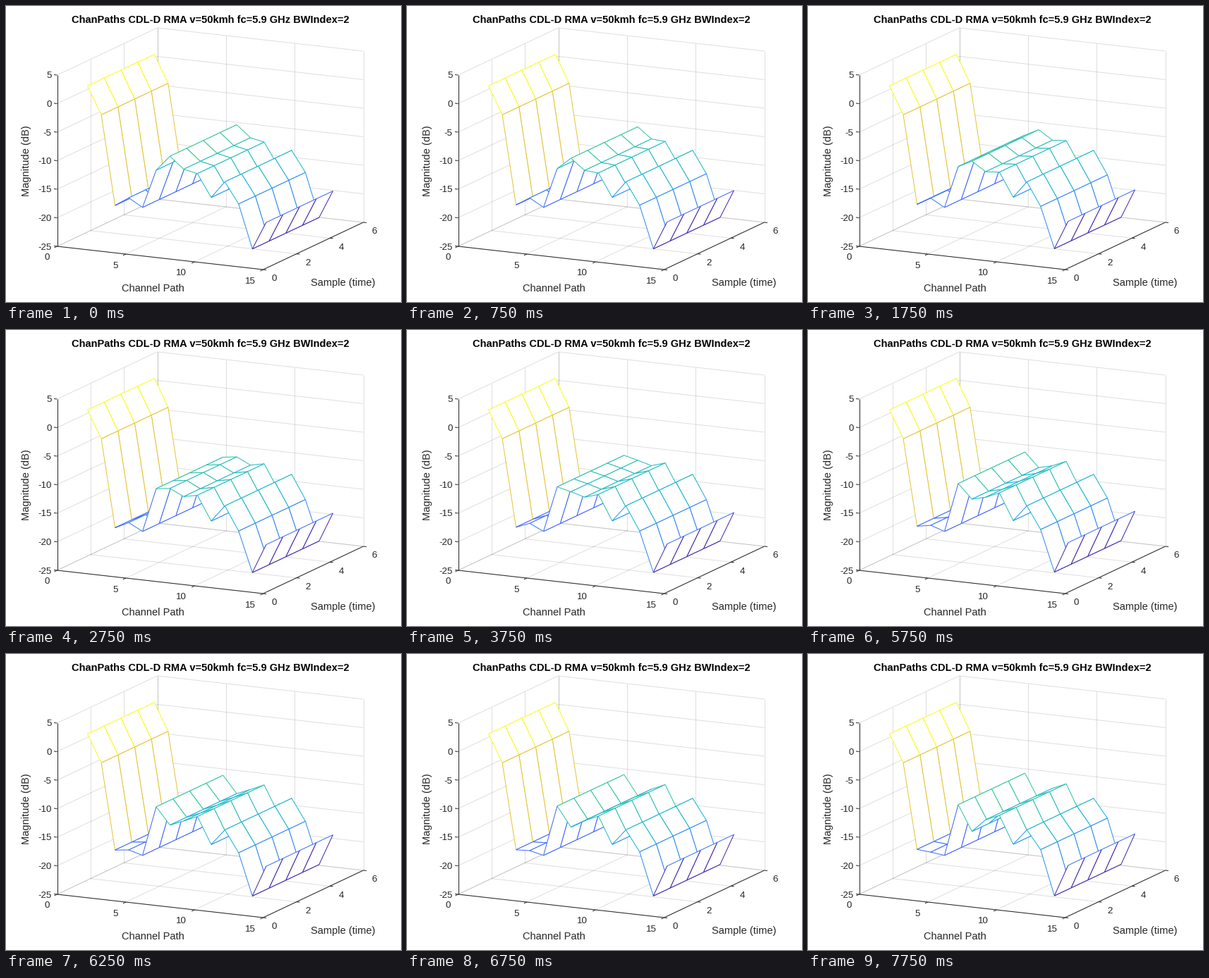
Write a matplotlib script that moves like this. It is 560 by 420 pixels and loops after 8 s.

```python
import numpy as np
import matplotlib.pyplot as plt
from matplotlib.animation import FuncAnimation
from matplotlib.collections import LineCollection, PolyCollection
from matplotlib.colors import LinearSegmentedColormap

W, H, DPI = 560, 420, 100
FRAMES, INTERVAL = 32, 250
SAMPLES = range(1, 6)
FLOOR, TOP = -25, 5
INK = (0.15, 0.15, 0.15)
PX = 72 / DPI  # points per pixel

# Power of each channel path in dB, at the start of the loop.
START = np.array([2.0, -2.8, -18.4, -16.8, -18.2, -11.4, -8.7,
                  -10.7, -11.2, -15.1, -12.1, -15.7, -23.3, -18.4])
# Fading paths: slope and curvature over one loop, in dB.
FADE = {3: (0.9, -0.2), 4: (0, -1.1), 6: (2.9, -0.55), 7: (-3.6, -1.15),
        8: (-2.35, 1.9), 9: (1.2, -0.1), 10: (0.2, 0), 12: (-2.6, 3),
        13: (0.2, 0), 14: (0.9, 0)}

parula = LinearSegmentedColormap.from_list("parula", [
    (0.242, 0.150, 0.660), (0.281, 0.323, 0.958), (0.179, 0.529, 0.968),
    (0.069, 0.695, 0.839), (0.216, 0.784, 0.592), (0.672, 0.779, 0.223),
    (0.997, 0.766, 0.220), (0.977, 0.984, 0.080),
])

plt.rcParams["font.family"] = "Liberation Sans"
fig = plt.figure(figsize=(W / DPI, H / DPI), dpi=DPI, facecolor="white")
ax = fig.add_axes([0, 0, 1, 1])
ax.set_xlim(0.5, W + 0.5)
ax.set_ylim(H, 0)
ax.axis("off")


def project(x, y, z):
    """Orthographic view: path, sample and dB to stage pixels."""
    return (73 + 19.47 * x + 23.67 * y,
            341 + 2.2 * x - 11.17 * y - 8.1 * (z - FLOOR))


def segment(a, b):
    return [project(*a), project(*b)]


def add_lines(lines, color):
    ax.add_collection(LineCollection(lines, colors=[color], linewidths=PX))


def label(x, y, text, size=14.67, **style):
    style = {"color": INK, "ha": "center", "va": "center_baseline", **style}
    ax.text(x, y, text, fontsize=size * PX, **style)


def draw_grid():
    lines = []
    for z in range(FLOOR, TOP + 1, 5):
        lines.append(segment((0, 0, z), (0, 6, z)))
        lines.append(segment((0, 6, z), (15, 6, z)))
    for x in range(0, 16, 5):
        lines.append(segment((x, 6, FLOOR), (x, 6, TOP)))
        lines.append(segment((x, 0, FLOOR), (x, 6, FLOOR)))
    for y in range(0, 7, 2):
        lines.append(segment((0, y, FLOOR), (0, y, TOP)))
        lines.append(segment((0, y, FLOOR), (15, y, FLOOR)))
    add_lines(lines, (*INK, 0.15))


def draw_axis(points, values, tick, offset, ha):
    """Axis line through the points, with a tick and a number at each."""
    spots = [project(*p) for p in points]
    lines = [[spots[0], spots[-1]]]
    for (x, y), value in zip(spots, values):
        lines.append([(x, y), (x + tick[0], y + tick[1])])
        label(x + offset[0], y + offset[1], str(value), 13.33, ha=ha)
    add_lines(lines, INK)


draw_grid()
levels, paths, times = range(FLOOR, TOP + 1, 5), range(0, 16, 5), range(0, 7, 2)
draw_axis([(0, 0, z) for z in levels], levels, (-4.5, -0.5), (-8, 0), "right")
draw_axis([(x, 0, FLOOR) for x in paths], paths, (-4, 1.9), (-11, 15), "right")
draw_axis([(15, y, FLOOR) for y in times], times, (4.5, 0.5), (16, 12), "center")

label(290, 18.5, "ChanPaths CDL-D RMA v=50kmh fc=5.9 GHz BWIndex=2",
      color="black", weight="bold")
label(208.5, 399.5, "Channel Path")
label(478.5, 391.5, "Sample (time)")
label(29.5, 219.5, "Magnitude (dB)", rotation=90, va="center")

mesh = PolyCollection([], closed=False, zorder=3, linewidths=PX,
                      facecolors="white")
ax.add_collection(mesh)


def magnitudes(u):
    level = START.copy()
    for path, (slope, curve) in FADE.items():
        level[path - 1] += slope * u + curve * u * u
    return level


def update(frame):
    level = magnitudes(frame / (FRAMES - 1))
    color = parula((level - level.min()) / np.ptp(level))
    shapes, edges = [], []
    # Far cells first, so that nearer white faces hide them.
    for y in reversed(SAMPLES[:-1]):
        for i in range(len(level) - 1):
            a, d = [project(i + 1, y + k, level[i]) for k in (0, 1)]
            b, c = [project(i + 2, y + k, level[i + 1]) for k in (0, 1)]
            near, far = color[i], color[i + 1]
            shapes += [[a, b, c, d], [d, c], [b, c], [a, d], [a, b]]
            edges += [(0, 0, 0, 0), near, far, near, near]
    mesh.set_verts(shapes, closed=False)
    mesh.set_edgecolor(edges)
    return [mesh]


anim = FuncAnimation(fig, update, frames=FRAMES, interval=INTERVAL,
                     repeat=True, repeat_delay=0)
plt.show()
```
